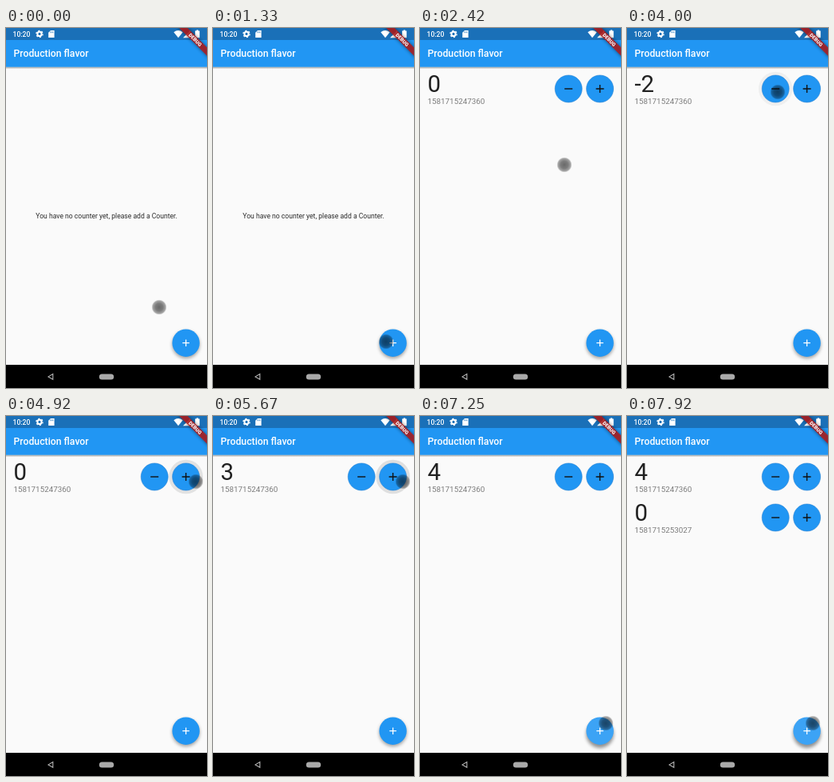
These frames come from a looping animation (252 by 450 pixels, 8 s). An HTML page:

```html
<!DOCTYPE html>
<html lang="en">
<head>
<meta charset="utf-8">
<title>Counter app</title>
<style>
  html, body { margin: 0; width: 100%; height: 100%; overflow: hidden; background: #000; }
  svg { display: block; width: 252px; height: 450px; font-family: Roboto, sans-serif; }
  .value { font-size: 29.4px; fill: #212121; }
  .id { font-size: 9.8px; fill: #7b7b7b; }
</style>
</head>
<body>
<svg viewBox="0 0 252 450">
  <defs>
    <radialGradient id="touch">
      <stop offset="0" stop-opacity=".58"/>
      <stop offset=".5" stop-opacity=".5"/>
      <stop offset=".82" stop-opacity=".34"/>
      <stop offset="1" stop-opacity="0"/>
    </radialGradient>
    <linearGradient id="edge" x2="0" y2="1">
      <stop offset="0" stop-opacity=".38"/>
      <stop offset="1" stop-opacity="0"/>
    </linearGradient>
    <filter id="blur" x="-50%" y="-50%" width="200%" height="200%"><feGaussianBlur stdDeviation="2"/></filter>
  </defs>

  <rect width="252" height="421" fill="#fafafa"/>
  <rect y="48.5" width="252" height="3" fill="url(#edge)"/>
  <rect width="252" height="48.7" fill="#2196f3"/>
  <rect width="252" height="15" fill="#1a70b8"/>
  <text x="9.5" y="36.2" font-size="12.26" font-weight="500" fill="#fff">Production flavor</text>

  <g fill="#fff">
    <text x="8.5" y="10.6" font-size="8.6" font-weight="500">10:20</text>
    <circle cx="42" cy="7.4" r="2.6" fill="none" stroke="#fff" stroke-width="2"/>
    <circle cx="42" cy="7.4" r="4.1" fill="none" stroke="#fff" stroke-width="1.3" stroke-dasharray="2.1 2.19"/>
    <path d="M56 3h4.6v9h-7.4V5.8z"/>
    <path d="M55.7 4.4v1.8M57.3 4.4v1.8M58.9 4.4v1.8" stroke="#1a70b8" stroke-width=".7"/>
    <path d="M210.3 5.2Q216 .8 221.7 5.2L216 12.2z"/>
    <path d="M231 3v9.2h-9z"/>
    <path d="M238.7 2.4h2.4v1h1.6v8.8h-5.6V3.4h1.6z"/>
  </g>

  <g id="rows"></g>
  <text id="empty" x="126" y="238" font-size="8.58" text-anchor="middle" fill="#2b2b2b">You have no counter yet, please add a Counter.</text>

  <g transform="translate(225.6 393.7)">
    <circle id="shadow" r="17.2" filter="url(#blur)"/>
    <circle r="17.2" fill="#2196f3"/>
    <circle id="splash" r="17.2" fill="#fff"/>
    <path d="M-4.3 0h8.6M0-4.3v8.6" stroke="#fff" stroke-width="1.25"/>
  </g>

  <rect y="421" width="252" height="29"/>
  <path d="M53 435.9l5.8-3.4v6.8z" fill="none" stroke="#b5b5b5" stroke-width="1.1"/>
  <rect x="116.8" y="432.4" width="18.4" height="7" rx="3.5" fill="#a9a9a9"/>

  <g transform="translate(252 0) rotate(45)">
    <rect x="-30" y="17.2" width="60" height="7.4" filter="url(#blur)" opacity=".5"/>
    <rect x="-30" y="17.2" width="60" height="7.4" fill="#b71c1c" fill-opacity=".82"/>
    <text y="23.1" font-size="6.25" font-weight="900" text-anchor="middle" fill="#fff">DEBUG</text>
  </g>
  <circle id="cursor" r="9.6" fill="url(#touch)"/>
</svg>

<script>
const LOOP = 8000;
const $ = id => document.getElementById(id);

// time, x, y
const path = [
  [170, 192, 349], [580, 217, 392], [2200, 217, 392], [2420, 181, 171],
  [2620, 181, 171], [3000, 189, 80], [4180, 189, 80], [4400, 238, 82],
  [6020, 238, 82], [6330, 237, 359], [6750, 233, 384]
];
// press, release
const addTaps = [[1500, 1750], [7170, 7420], [7800, 8100]];
const minusTaps = [[3080, 3250], [3680, 3840]];
const plusTaps = [[4290, 4420], [4600, 4750], [4850, 5080], [5210, 5330], [5520, 5670], [5790, 5920]];

const rows = [
  { id: "1581715247360", start: addTaps[0][1], minus: minusTaps, plus: plusTaps },
  { id: "1581715253027", start: addTaps[1][1], minus: [], plus: [] }
];

const clamp = v => Math.max(0, Math.min(1, v));
const smooth = v => v * v * (3 - 2 * v);
const released = (taps, t) => taps.filter(tap => t >= tap[1]).length;
const pressure = (taps, t) =>
  Math.max(0, ...taps.map(([down, up]) => clamp((t - down) / 80) * clamp(1 - (t - up) / 260)));

const button = (x, icon) => `<g transform="translate(${x} 76)">
  <circle class="halo" r="21.3" fill="#000" fill-opacity=".11"/>
  <circle r="17" fill="#2196f3" stroke="#2b83d3" stroke-width=".6"/>
  <path d="${icon}" stroke="#111" stroke-width="1.4"/></g>`;

$("rows").innerHTML = rows.map((row, i) => `<g transform="translate(0 ${i * 51})">
  <text class="value" x="9.4" y="79.6"></text>
  <text class="id" x="9.6" y="95.4">${row.id}</text>
  ${button(186.2, "M-5 0h10")}${button(225.6, "M-5 0h10M0-5v10")}</g>`).join("");

rows.forEach((row, i) => {
  row.group = $("rows").children[i];
  row.value = row.group.querySelector(".value");
  row.halos = row.group.querySelectorAll(".halo");
});

function cursorAt(t) {
  const next = path.findIndex(p => p[0] > t);
  if (next < 0) return path.at(-1).slice(1);
  if (next === 0) return path[0].slice(1);
  const [t0, x0, y0] = path[next - 1], [t1, x1, y1] = path[next];
  const k = smooth((t - t0) / (t1 - t0));
  return [x0 + (x1 - x0) * k, y0 + (y1 - y0) * k];
}

function draw(t) {
  for (const row of rows) {
    row.group.style.display = t >= row.start ? "" : "none";
    row.value.textContent = released(row.plus, t) - released(row.minus, t);
    row.halos[0].setAttribute("opacity", pressure(row.minus, t));
    row.halos[1].setAttribute("opacity", pressure(row.plus, t));
  }
  $("empty").style.display = t < rows[0].start ? "" : "none";

  const press = pressure(addTaps, t);
  $("splash").setAttribute("opacity", press * .12);
  $("shadow").setAttribute("cy", 2.2 + press * 1.8);
  $("shadow").setAttribute("opacity", .36 + press * .06);
  $("cursor").setAttribute("transform", `translate(${cursorAt(t)})`);
}

const begin = performance.now();
function tick() {
  draw((performance.now() - begin) % LOOP);
  requestAnimationFrame(tick);
}
tick();
</script>
</body>
</html>
```
